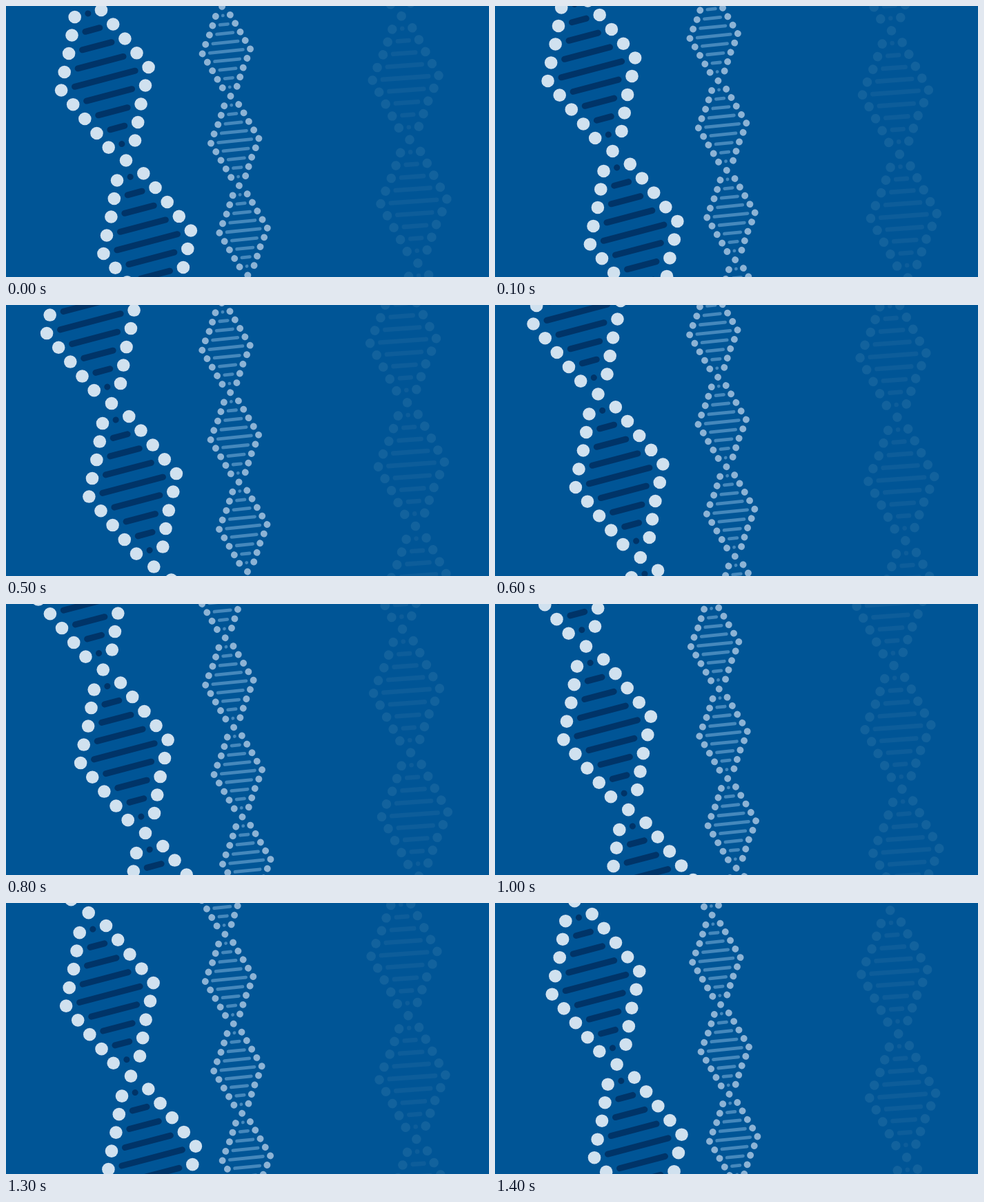
These frames come from a looping animation (700x394 px, 1500 ms). An HTML page with a canvas:

```html
<!DOCTYPE html>
<html lang="en">
<head>
<meta charset="utf-8">
<title>DNA strands</title>
<style>
  html, body { margin: 0; width: 100%; height: 100%; overflow: hidden; background: #005596; }
  canvas { display: block; width: 700px; height: 394px; }
</style>
</head>
<body>
<canvas id="stage" width="700" height="394"></canvas>
<script>
const ctx = document.getElementById('stage').getContext('2d');
const WIDTH = 700, HEIGHT = 394;
const STEP_MS = 100, STEPS = 15;
const TICKS_PER_STEP = 24 / 5;

// One twist of the helix: from one crossing bead to the next.
const TWIST = [61.3, 237.5];
const LEFT = [
  [-13, 29], [-17.2, 55.5], [-21.6, 82], [-28, 109], [-32.6, 135.5],
  [-15.5, 156.2], [1.6, 177], [18.8, 198], [36, 218.6]
];
// The right side is the left side turned half way round the twist's centre.
const RIGHT = LEFT.map(([x, y]) => [TWIST[0] - x, TWIST[1] - y]).reverse();

const BEAD_RADIUS = 9.3, RUNG_WIDTH = 9, RUNG_INSET = 20.1;
const TWIST_LENGTH = Math.hypot(...TWIST);
const TWIST_ANGLE = Math.atan2(TWIST[1], TWIST[0]);

// node: a crossing bead at time zero; twist: vector to the next crossing;
// speed: twists travelled per tick, negative is upwards.
const strands = [
  { node: [585, 194.3], twist: [11.9, 179.6], speed: 5.3 / 179.6,
    bead: '#12629d', rung: '#0d5d9a' },
  { node: [325.5, 131], twist: [12.4, 130.2], speed: -3 / 70,
    bead: '#8cb3d5', rung: '#4588bc' },
  { node: [174, 224.5], twist: TWIST, speed: -1 / 70,
    bead: '#d0e1ef', rung: '#003468' }
];

function drawBead([x, y]) {
  ctx.beginPath();
  ctx.arc(x, y, BEAD_RADIUS, 0, 2 * Math.PI);
  ctx.fill();
}

function drawRung([x1, y1], [x2, y2]) {
  const length = Math.hypot(x2 - x1, y2 - y1);
  const half = Math.max(length / 2 - RUNG_INSET, 0.05);
  const dx = (x2 - x1) / length * half, dy = (y2 - y1) / length * half;
  const cx = (x1 + x2) / 2, cy = (y1 + y2) / 2;
  ctx.beginPath();
  ctx.moveTo(cx - dx, cy - dy);
  ctx.lineTo(cx + dx, cy + dy);
  ctx.stroke();
}

function drawTwist() {
  LEFT.forEach((bead, i) => drawRung(bead, RIGHT[i]));
  drawBead([0, 0]);
  LEFT.forEach(drawBead);
  RIGHT.forEach(drawBead);
}

function drawStrand({ node, twist, speed, bead, rung }, tick) {
  const scale = Math.hypot(...twist) / TWIST_LENGTH;
  const angle = Math.atan2(twist[1], twist[0]) - TWIST_ANGLE;
  const phase = (tick * speed) % 1;
  ctx.fillStyle = bead;
  ctx.strokeStyle = rung;
  ctx.lineWidth = RUNG_WIDTH;
  ctx.lineCap = 'round';
  for (let i = -4; i <= 4; i++) {
    const shift = phase + i;
    ctx.save();
    ctx.translate(node[0] + twist[0] * shift, node[1] + twist[1] * shift);
    ctx.rotate(angle);
    ctx.scale(scale, scale);
    drawTwist();
    ctx.restore();
  }
}

function render(now) {
  const step = Math.floor(now / STEP_MS) % STEPS;
  const tick = Math.floor(step * TICKS_PER_STEP);
  ctx.fillStyle = '#005596';
  ctx.fillRect(0, 0, WIDTH, HEIGHT);
  strands.forEach(strand => drawStrand(strand, tick));
}

let start;
function loop(now) {
  start ??= now;
  render(now - start);
  requestAnimationFrame(loop);
}
render(0);
requestAnimationFrame(loop);
</script>
</body>
</html>
```
